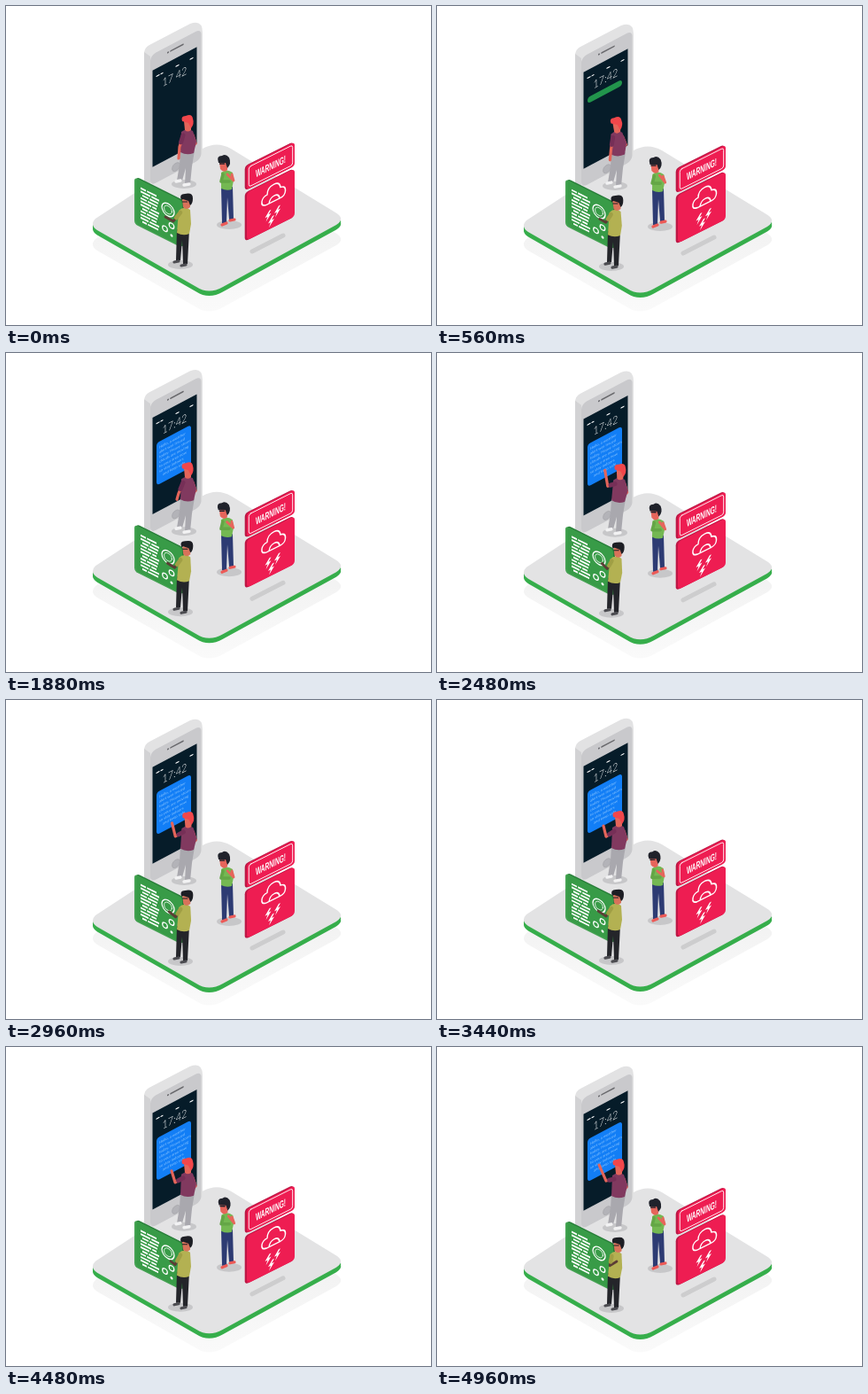
An HTML page for the animation above (5 s loop, 480x360 px).

```html
<!DOCTYPE html>
<html lang="en">
<head>
<meta charset="utf-8">
<title>Storm warning</title>
<style>
html, body { margin: 0; width: 100%; height: 100%; overflow: hidden; background: #fff; }
svg { display: block; width: 100vw; height: 100vh; }
text { font-family: Lato, "Open Sans", sans-serif; fill: #fff; }
.line { fill: none; stroke: #fff; stroke-linecap: round; stroke-linejoin: round; }
.limb { fill: none; stroke-linecap: round; stroke-linejoin: round; }
.bold { font-family: "Liberation Sans", Arial, sans-serif; font-weight: 700; font-size: 7.6px; text-anchor: middle; }
</style>
</head>
<body>
<svg viewBox="0 0 480 360">
  <defs>
    <path id="slab" d="M101 240Q94 247 103 253L215 317Q229 326 245 317L373 247Q384 240 372 233L254 161Q238 152 222 161Z"/>
    <path id="bolt" d="M2-5L-3 1H0L-2 6L4-1H1L4-5Z" fill="#fff"/>
    <linearGradient id="fade" x1="0" y1="0" x2="0" y2="1">
      <stop offset=".5" stop-color="#f3f3f3"/><stop offset="1" stop-color="#fafafa"/>
    </linearGradient>
  </defs>

  <use href="#slab" y="23" fill="url(#fade)"/>

  <g id="stage">
    <g fill="#36ae4b"><use href="#slab" y="5.5"/><use href="#slab" y="3"/></g>
    <use href="#slab" fill="#e3e3e4"/>
    <path class="limb" d="M278 277L313 259" stroke="#cdcdce" stroke-width="5"/>

    <g id="phone">
      <path d="M156 54Q156 47 162 44L208 20Q222 15 222 30V168L167 202Q163 204 156 197Z" fill="#e2e2e3"/>
      <path d="M156 52L163 57V202L156 197Z" fill="#d2d2d4"/>
      <g transform="matrix(1 -.53 0 1 163 56)">
        <rect width="57.5" height="147" rx="6" fill="#c9c9cc"/>
        <path class="limb" d="M23 7H37" stroke="#68686c" stroke-width="1.6"/>
        <circle cx="20" cy="7" r=".9" fill="#55555a"/>
        <rect x="2.5" y="18" width="50" height="109" fill="#061c29"/>
        <g class="line" stroke-width="1.2"><path d="M7 27H10M12 27H14M29 27.5H32M45 28H48"/></g>
        <text x="13.5" y="42.5" font-size="12.5" font-weight="300" transform="translate(13.5 0) scale(.87 1) translate(-13.5 0)">17<tspan id="colon">:</tspan>42</text>
        <rect id="bubble" x="7" y="49" rx="3.5"/>
        <g id="message" font-size="4.2"></g>
        <circle cx="29" cy="141" r="4.4" fill="#b3b3b8" stroke="#a3a3a8" stroke-width=".6"/>
      </g>
    </g>

    <g id="reader">
      <ellipse cx="201" cy="201" rx="14" ry="5" fill="#c7c7c9"/>
      <path d="M197 163H213L210 181L208 201H202L203 183L199 197H193L196 179Z" fill="#a9a8ae"/>
      <path class="limb" d="M192 198L197 197M201 202L207 201" stroke="#f2f2f3" stroke-width="3.4"/>
      <g id="readerTop">
        <path class="limb" d="M211 146L214 155L207 162" stroke="#e4655a" stroke-width="3.4"/>
        <path d="M198 142Q204 137 211 141L215 153L212 166Q204 169 197 165Z" fill="#81395f"/>
        <path d="M201 130H209V140Q205 143 202 140Z" fill="#e4655a"/>
        <path d="M199 130Q197 124 203 124Q210 121 211 127Q213 133 209 138L206 132Z" fill="#f1474b"/>
        <path id="readerArm" class="limb" stroke="#e4655a" stroke-width="3.2"/>
        <path id="readerSleeve" class="limb" stroke="#762f57" stroke-width="5"/>
      </g>
    </g>

    <g id="panel">
      <g transform="matrix(1 .5 0 1 145 193)">
        <rect x="2" y="-1.5" width="54" height="53" rx="4" fill="#277d38"/>
        <rect width="54" height="53" rx="4" fill="#3a9e49" fill-opacity=".94"/>
        <g id="rows" class="line" stroke-width="1.9" style="stroke-linecap:butt"></g>
        <g class="line" stroke-width="1.3">
          <circle cx="38" cy="18" r="7"/><circle cx="38" cy="18" r="4.4" stroke-width=".7"/>
          <circle cx="34.5" cy="41" r="2.8"/><circle cx="42" cy="34" r="2.8"/>
        </g>
        <circle cx="42" cy="45" r="1.5" fill="#fff"/>
      </g>
    </g>

    <g id="worker">
      <ellipse cx="197" cy="292" rx="14" ry="5" fill="#c7c7c9"/>
      <path d="M193 252H207L205 291H200L199 264L197 287H192Z" fill="#24252a"/>
      <path class="limb" d="M190 289L195 288M198 293L203 292" stroke="#4c4c51" stroke-width="3.2"/>
      <g id="workerTop">
        <path d="M195 231Q201 225 208 230L209 246L207 257Q200 260 193 256Z" fill="#b3b152"/>
        <path d="M199 218H208V227Q204 231 200 227Z" fill="#d8725a"/>
        <path d="M198 219Q195 212 202 212Q211 210 211 217Q211 223 208 225L206 220L200 218Z" fill="#1d1e24"/>
        <path d="M199 221H205" stroke="#1d1e24"/>
        <path id="workerArm" class="limb" stroke="#5b3d35" stroke-width="2.8"/>
        <path id="workerSleeve" class="limb" stroke="#a09f45" stroke-width="4.6"/>
      </g>
    </g>

    <g id="thinker">
      <ellipse cx="252" cy="247" rx="14" ry="5" fill="#c7c7c9"/>
      <path d="M243 204H256L257 241H252L250 216L249 245H244Z" fill="#2d3b73"/>
      <path class="limb" d="M244 247L249 245M253 242L258 241" stroke="#ec5a57" stroke-width="3.2"/>
      <g id="thinkerTop">
        <path d="M243 188Q249 183 256 188L257 197L255 207Q249 209 243 206Z" fill="#74b852"/>
        <path d="M241 176H250V185Q246 189 242 184Z" fill="#e6655b"/>
        <path d="M240 177Q237 169 244 169Q248 166 252 171Q255 178 250 183L248 177Z" fill="#20222b"/>
        <path d="M241 178H247" stroke="#20222b" stroke-width="1.4"/>
        <path id="thinkerArm" class="limb" stroke="#e6655b" stroke-width="2.8"/>
        <path class="limb" d="M245 190L243 198L252 198" stroke="#64a646" stroke-width="3.6"/>
      </g>
    </g>
  </g>

  <g id="alert">
    <g transform="matrix(1 -.5 0 1 271 181)">
      <g fill="#bd1745"><rect x="-1.3" y="-1.2" width="55" height="28" rx="4"/><rect x="-1.3" y="29" width="55" height="55" rx="4"/></g>
      <g fill="#ee1d52"><rect x="1" width="54" height="27" rx="3.5"/><rect x="1" y="30" width="54" height="54" rx="4"/></g>
      <rect class="line" x="3.3" y="2.3" width="49.4" height="22.4" rx="2.5" stroke-width=".8"/>
      <text class="bold" transform="translate(28 18) scale(.87 1.55)">WARNING!</text>
      <path class="line" stroke-width="1.5" d="M23 55Q17 54 18 48.500Q19 44 24 44Q24 36 31.500 36Q38 36 39 43Q45 44 44.500 50Q44 55 39 55ZM26 55Q27 49 32 49Q37 49 38 55"/>
      <use href="#bolt" x="24.500" y="68"/><use href="#bolt" x="35" y="68"/><use href="#bolt" x="28" y="76"/>
    </g>
  </g>
</svg>
<script>
const LOOP = 5000, BOB = 2000;
const $ = id => document.getElementById(id);
const set = (id, attrs) => { for (const k in attrs) $(id).setAttribute(k, attrs[k]); };
const ramp = (t, a, b) => {
  const x = Math.min(1, Math.max(0, (t - a) / (b - a)));
  return x * x * (3 - 2 * x);
};
const mix = (a, b, x) => a + (b - a) * x;

// Eased value of a step table; each step is [time, ...values].
function pose(steps, t) {
  let i = 0;
  while (i < steps.length - 2 && t >= steps[i + 1][0]) i++;
  const a = steps[i], b = steps[i + 1], x = ramp(t, a[0], b[0]);
  return a.slice(1).map((v, k) => mix(v, b[k + 1], x));
}

// [time, elbow x, elbow y, hand x, hand y, lean]
const READER = [
  [0, 196, 159, 195, 172, 0], [560, 197, 159, 195, 171, -4], [1320, 196, 158, 197, 168, 0],
  [1900, 195, 158, 193, 165, 0], [2400, 192, 149, 188, 131, 3], [2900, 191, 151, 187, 136, 1],
  [3440, 191, 152, 188, 140, 0], [4000, 191, 152, 188, 141, 1], [4500, 191, 151, 187, 138, 0],
  [5000, 191, 148, 183, 130, 0]
];
const WORKER = [
  [0, 189, 243, 180, 238, 0], [560, 191, 242, 184, 238, -1], [1320, 189, 242, 179, 238, 0],
  [2480, 192, 242, 186, 236, 1], [3440, 191, 242, 182, 236, 0], [3960, 189, 242, 178, 239, -1],
  [4500, 191, 244, 186, 240, 0], [5000, 195, 244, 203, 239, 1]
];

const LINES = ["Hello, a weather", "alert was issued", "today. Heavy storm", "clouds are moving",
               "to your area now", "so stay indoors", "and keep safe"];
$("message").innerHTML = LINES.map((s, i) =>
  `<text x="${i > 5 ? 14 : 10}" y="${57 + i * 5.4}" style="fill:#8cc6ff">${s}</text>`).join("");

let rows = "";
for (let i = 0; i < 11; i++) {
  const y = 9 + i * 3.7, cut = 13 + (i * 5) % 7, end = 25 + (i * 3) % 4;
  rows += `M${i % 4 == 2 ? 9 : 7} ${y}H${cut}M${cut + 1.2} ${y}H${end}`;
}
set("rows", { innerHTML: "" });
$("rows").removeAttribute("innerHTML");
$("rows").innerHTML = `<path d="${rows}"/>`;

function arm(name, steps, t, sx, sy, px, py) {
  const [ex, ey, hx, hy, lean] = pose(steps, t);
  set(name + "Arm", { d: `M${sx} ${sy}L${ex} ${ey}L${hx} ${hy}` });
  set(name + "Sleeve", { d: `M${sx} ${sy}L${mix(sx, ex, .6)} ${mix(sy, ey, .6)}` });
  set(name + "Top", { transform: `rotate(${lean} ${px} ${py})` });
}

function draw(t) {
  const wave = (1 - Math.cos(t / BOB * 2 * Math.PI)) / 2;
  const drop = Math.pow(wave, .7);
  set("stage", { transform: `translate(0 ${drop * 3})` });
  set("alert", { transform: `translate(0 ${drop * 4.5})` });

  arm("reader", READER, t, 200, 146, 205, 166);
  arm("worker", WORKER, t, 197, 233, 200, 256);
  const sway = Math.sin(t / BOB * 2 * Math.PI);
  set("thinkerTop", { transform: `rotate(${sway} 249 206)` });
  set("thinkerArm", { d: `M255 190L${257 + sway * .6} 197L${250 + sway} ${190 - sway}` });

  const wide = ramp(t, 220, 480), open = ramp(t, 760, 1100);
  const w = 39 * wide;
  set("bubble", {
    x: 26.5 - w / 2, width: w, height: mix(7, 48, open),
    fill: `rgb(${mix(34, 18, open)},${mix(148, 126, open)},${mix(76, 246, open)})`
  });
  set("message", { opacity: ramp(t, 1040, 1300) });
  set("colon", { "fill-opacity": t % 1000 < 280 ? 0 : 1 });
}

function tick() {
  draw(performance.now() % LOOP);
  requestAnimationFrame(tick);
}
tick();
</script>
</body>
</html>
```
